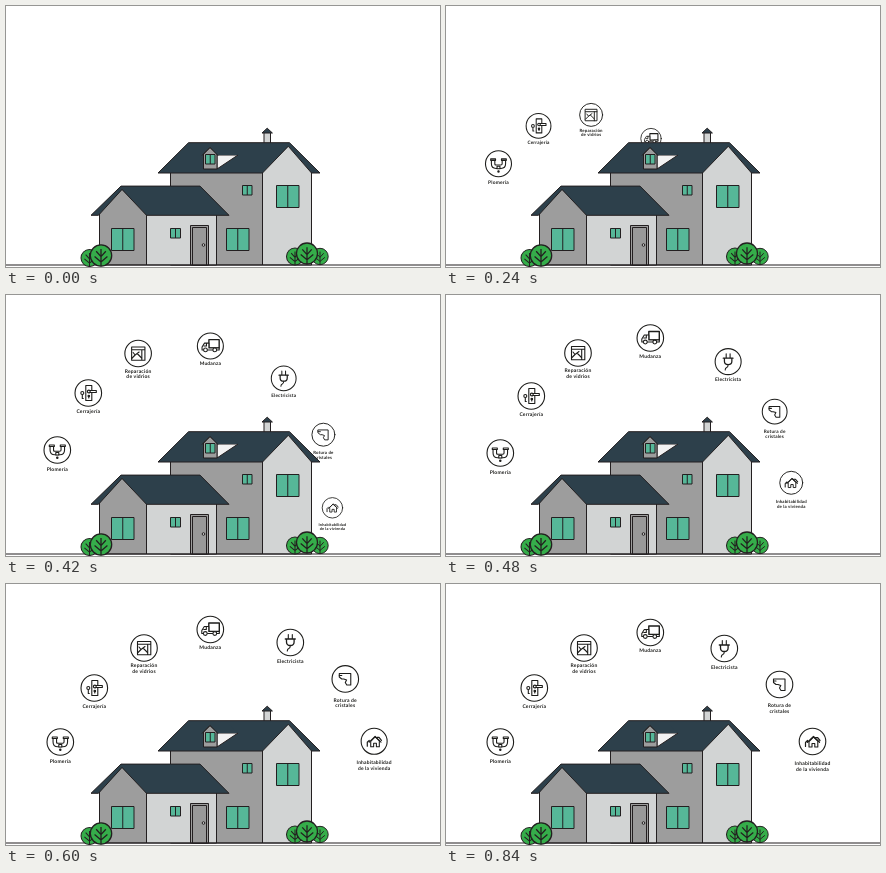
Animation of 434x261 px, one loop 3.6 s. Source, as an HTML page:

```html
<!DOCTYPE html>
<html lang="es">
<head>
<meta charset="utf-8">
<style>
  html, body { margin: 0; width: 100%; height: 100%; overflow: hidden; background: #fff; }
  svg { display: block; width: 434px; height: 261px; }
  text { font: 700 5px Lato, sans-serif; letter-spacing: .2px; text-anchor: middle; text-rendering: geometricPrecision; fill: #1d1d1b; stroke: none; }
  .icon { fill: #fff; stroke: #1d1d1b; stroke-width: 1.1; stroke-linejoin: round; stroke-linecap: round; }
  .line { fill: none; }
  .ink { fill: #1d1d1b; }
  .scene { stroke: #231f20; stroke-width: 1; stroke-linejoin: round; }
  .roof { fill: #2d404b; }
  .shade { fill: #9d9d9d; }
  .light { fill: #d2d4d4; }
  .glass { fill: #56b798; }
  .bush { fill: #35ad4a; }
</style>
</head>
<body>
<svg viewBox="0 0 434 261">
  <g id="icons"></g>
  <g class="scene">
    <path class="light" d="M258 126.500h6.500v11H258z"/>
    <path class="roof" d="M256 127l5.200-4.800 5.200 4.800z"/>
    <path class="shade" d="M164.500 164h92v95h-92z"/>
    <path class="light" d="M256.500 259V165l26-25.500L305.500 163v96z"/>
    <path class="roof" d="M152 167l30.500-30.300h101L314 167h-8.500L282.300 140.300 256.500 167z"/>
    <path fill="#f2f2f2" d="M211 149h21l-21 14z"/>
    <path class="shade" d="M197.500 163v-15l6.500-6.500 7 6.500v15z"/>
    <path class="roof" stroke="none" d="M204 141h19l9.500 8H211z"/>
    <path class="line" d="M196 149.500l8-8 8 8"/>
    <path class="light" d="M140.500 206h70v53h-70z"/>
    <path class="shade" d="M93.500 259V206l22.500-23 24.500 24v52z"/>
    <path class="roof" d="M85 209.300l30-29.200h79l29 29.200h-82.500L116 183.500l-23.500 25.800z"/>
    <path class="shade" d="M184.500 219.500h18V259h-18z"/>
    <path fill="#999" d="M186.500 221.500h14V259h-14z"/>
    <circle class="light" cx="197.500" cy="239" r="1.300"/>
    <g id="windows"></g>
    <path d="M0 259h434" stroke-width="1.100"/>
    <g id="bushes"></g>
  </g>
</svg>
<script>
const byId = id => document.getElementById(id);

byId('windows').innerHTML = [
  [105.500, 222.500, 22.500, 22], [220.500, 222.500, 22.500, 22], [270.500, 179.500, 22.500, 22],
  [236.500, 179.500, 9.500, 9.500], [164.500, 222.500, 10, 9.500], [199.500, 148.500, 9.500, 9.500]
].map(([x, y, w, h]) =>
  `<path class="glass" d="M${x} ${y}h${w}v${h}h${-w}zM${x + w / 2} ${y}v${h}"/>`).join('');

byId('bushes').innerHTML = [
  [83.500, 252, 8.500], [95, 249.500, 10.700], [289, 250.500, 8.500], [314, 250.500, 8.200], [301, 247.500, 10.500]
].map(([x, y, r]) => `<g transform="translate(${x} ${y}) scale(${r / 10})" stroke-width="1.200">
  <circle class="bush" r="10"/>
  <path class="line" d="M0 10V-6M0 1l-4.500-5M0 1l4.500-5M0 6l-6-5M0 6l6-5"/></g>`).join('');

const trap = 'M-5.500-4V0Q-5.500 3-2.500 3H2.500Q5.500 3 5.500 0V-4';

// x, y at rest, overshoot direction, offset of the label, label lines, drawing
const icons = [
  [54.300, 158, -1, 20.700, ['Plomería'], `
    <path class="line" d="${trap}" stroke-width="4.600" stroke-linecap="butt"/>
    <path class="line" d="${trap}" stroke="#fff" stroke-width="2.400" stroke-linecap="butt"/>
    <path d="M-8-5h5v1.500h-5zM3-5h5v1.500H3zM-1.500 2.500h3V5h-3z"/>
    <circle class="ink" cy="7.800" r=".7"/>`],
  [88.300, 104, -1, 19.700, ['Cerrajería'], `
    <path d="M-2.500-7.500h6V7.500h-6z"/>
    <path d="M0-2.500h8V-.5H0z"/>
    <circle cx=".5" cy="-1.500" r="1.400"/><circle class="ink" cx=".5" cy="3" r=".8"/>
    <path class="line" d="M.5 3v2M-6 1.500v4h1"/><circle cx="-6" cy="0" r="1.500"/>`],
  [138, 64, -1, 19.300, ['Reparación', 'de vidrios'], `
    <path d="M-6.500-6.500h13.300V6.800H-6.500zM-6.500-3.700H6.800M3.700-3.700V6.800"/>
    <path class="line" d="M-6.500 5l3.500-3.500-2-2.500M-3 1.500L1-1.500M-1 0l4.500 4.500"/>`],
  [204.300, 48.500, 0, 19.600, ['Mudanza'], `
    <path d="M-1.500-6.500H9V2H-1.500z" stroke-width="1.400"/>
    <path d="M9 2v2H-8.500V1L-6-3h4.500v5zM-6.500 0h2.500v-3"/>
    <circle cx="-5" cy="4" r="1.900"/><circle cx="4.500" cy="4" r="1.900"/>`],
  [278.300, 64.500, 1, 20, ['Electricista'], `
    <path class="line" d="M-2-8v4.500M2-8v4.500M0 3Q0 5.500-1.500 6T-3 8.500"/>
    <path d="M-5-3.500H5M-3.800-3.500h7.600V-.5Q3.800 3 0 3T-3.800-.5z" stroke-width="1.300"/>`],
  [333.500, 100.500, 1, 22.700, ['Rotura de', 'cristales'], `
    <path d="M-6-5.500H5.500V6H1.500L0 3.500 1.300 1-1.500 0H-3.500L-6-2z"/>
    <path class="line" d="M-6-3.500h2.500"/>`],
  [366.500, 157.500, 1, 23.300, ['Inhabitabilidad', 'de la vivienda'], `
    <path d="M-3.500 0v5.500H-.5V2H2.300v3.500h3V-.5L1-4.500z"/>
    <path class="line" d="M-5 .8L1-5 7 .8M3-4h2l2.500 3M-7 5V1l2-2" stroke-width="1.200"/>`]
];

byId('icons').innerHTML = icons.map(([, , , top, lines, art]) => `<g class="icon">
  <circle r="13.300"/>${art}
  ${lines.map((s, i) => `<text y="${top + i * 5.700}">${s}</text>`).join('')}</g>`).join('');
const nodes = [...byId('icons').children];

const LOOP = 3600, STEP = 30, STAGGER = 60, OVERSHOOT = 6;
const clamp = v => Math.max(0, Math.min(1, v));

function draw(now) {
  const t = Math.floor(now % LOOP / STEP) * STEP;
  icons.forEach(([x, y, dir], i) => {
    const age = t - i * STAGGER;
    const rest = (1 - clamp(age / 320)) ** 2;
    const extra = OVERSHOOT * (1 - clamp((age - 360) / 120));
    // each icon leaves from a smaller arc hidden behind the house
    const startX = 207 + (x - 207) * .6, startY = 179 + (y - 48.500) * .6;
    const endX = x + dir * extra, endY = y - extra;
    const px = endX + (startX - endX) * rest, py = endY + (startY - endY) * rest;
    nodes[i].setAttribute('transform', `translate(${px} ${py}) scale(${1 - .35 * rest})`);
    nodes[i].setAttribute('visibility', age < 0 ? 'hidden' : 'visible');
  });
}

const begin = performance.now();
function tick() {
  draw(performance.now() - begin);
  requestAnimationFrame(tick);
}
tick();
</script>
</body>
</html>
```
